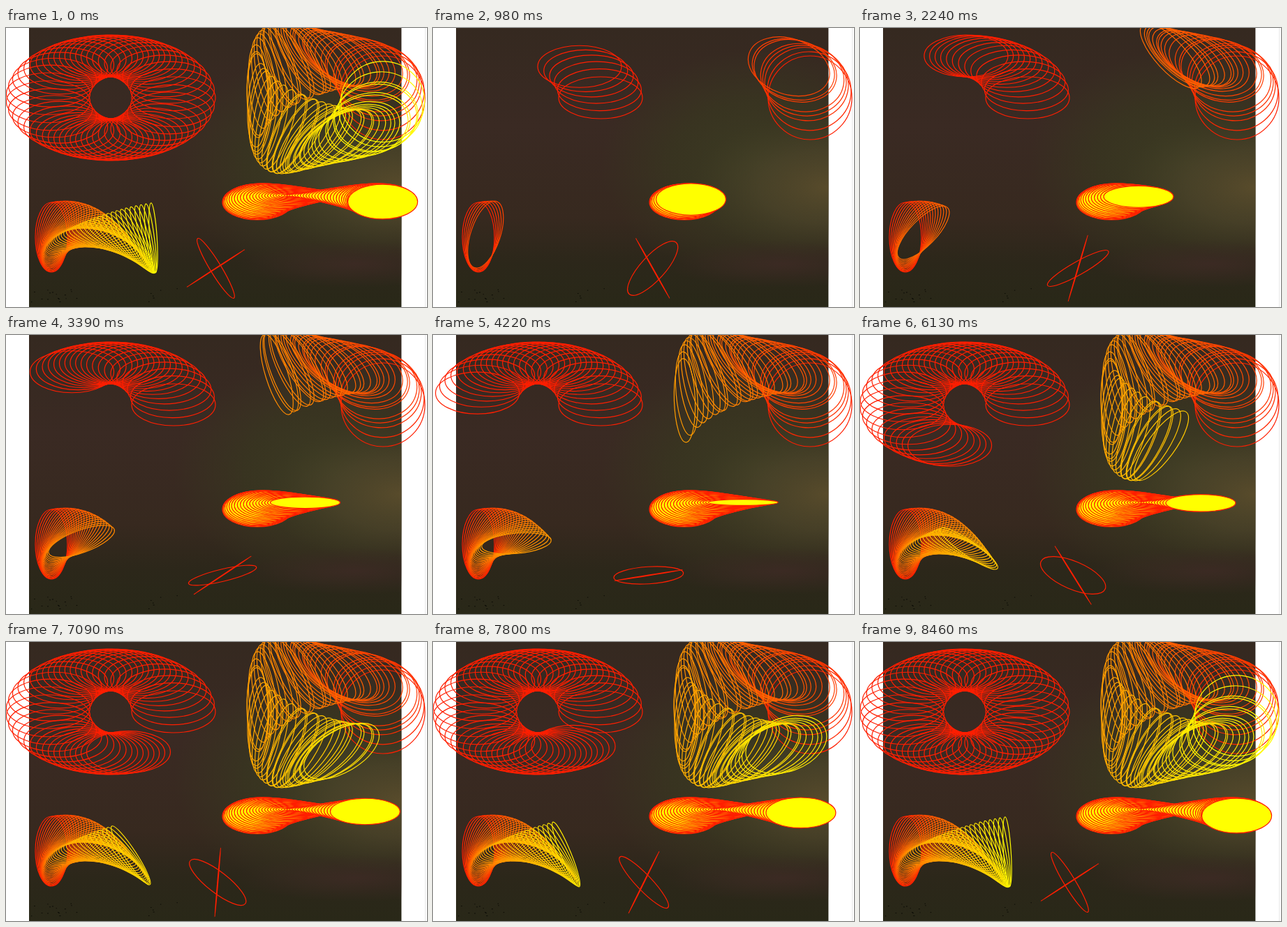
An HTML page for the animation above (8860 ms loop, 603 by 400 pixels).

```html
<!DOCTYPE html>
<html lang="en">
<head>
<meta charset="utf-8">
<title>Ellipse spirals</title>
<style>
  html, body { margin: 0; width: 100%; height: 100%; overflow: hidden; background: #fff; }
  svg { display: block; }
</style>
</head>
<body>
<svg id="stage" width="603" height="400" viewBox="0 0 603 400">
  <defs>
    <linearGradient id="ground" x1="0" y1="0" x2="0" y2="1">
      <stop offset="0" stop-color="#352920"/>
      <stop offset=".35" stop-color="#3a2a23"/>
      <stop offset=".68" stop-color="#37291f"/>
      <stop offset=".84" stop-color="#2c271a"/>
      <stop offset="1" stop-color="#292818"/>
    </linearGradient>
    <radialGradient id="moss">
      <stop offset="0" stop-color="#3d3c23"/>
      <stop offset=".55" stop-color="#383620" stop-opacity=".8"/>
      <stop offset="1" stop-color="#383620" stop-opacity="0"/>
    </radialGradient>
    <radialGradient id="glow">
      <stop offset="0" stop-color="#584b2b"/>
      <stop offset=".5" stop-color="#4c442a" stop-opacity=".7"/>
      <stop offset="1" stop-color="#403c24" stop-opacity="0"/>
    </radialGradient>
    <radialGradient id="dusk">
      <stop offset="0" stop-color="#3b2a23"/>
      <stop offset="1" stop-color="#3b2a23" stop-opacity="0"/>
    </radialGradient>
    <clipPath id="panel"><rect x="33" width="533.4" height="400"/></clipPath>
  </defs>
  <rect width="603" height="400" fill="#fff"/>
  <g clip-path="url(#panel)">
    <rect x="33" width="534" height="400" fill="url(#ground)"/>
    <ellipse cx="470" cy="195" rx="230" ry="165" fill="url(#moss)"/>
    <ellipse cx="565" cy="228" rx="195" ry="105" fill="url(#glow)"/>
    <ellipse cx="500" cy="338" rx="170" ry="34" fill="url(#dusk)"/>
    <g id="specks" fill="#0c0c06"></g>
  </g>
  <path d="M600.5 0V400" stroke="#e8e8e8"/>
  <g id="art" fill="none" stroke-width="1.2"></g>
</svg>
<script>
const LOOP = 8860, CLEAR = 330, STEPS = 49, LAST = 48.5;
const RED = '#ff1e00', YELLOW = '#ffff00';

// [time in ms, steps drawn]: bursts of drawing with short rests
const BEATS = [
  [330, 0], [930, 5], [1390, 6], [1590, 6.5], [2240, 12.5], [2400, 14], [2560, 14.5],
  [3060, 17.5], [3260, 18], [3390, 19], [4100, 22.5], [4160, 23], [4380, 24], [5140, 29],
  [5340, 29.5], [5940, 33], [6100, 34], [6890, 39], [7090, 40], [7890, 44], [8020, 45],
  [8460, LAST]
];

const { sin, cos, abs, PI } = Math;
const art = document.getElementById('art');

function add(parent, tag, attrs) {
  const node = document.createElementNS('http://www.w3.org/2000/svg', tag);
  parent.appendChild(node);
  return set(node, attrs);
}

function set(node, attrs) {
  for (const key in attrs) node.setAttribute(key, attrs[key]);
  return node;
}

const oval = (cx, cy, rx, ry, tilt = 0) =>
  ({ cx, cy, rx, ry, transform: `rotate(${tilt} ${cx} ${cy})` });

// Ellipse parameter of the point seen at a polar angle (axes 3:2)
const bend = angle => Math.atan2(1.5 * sin(angle), cos(angle));

const blend = p => `rgb(255,${Math.round(30 + 225 * p ** .8)},0)`;

function ring(p) {
  const a = bend(2 * PI * p);
  return { ...oval(150 + 90 * cos(a), 100 - 60 * sin(a), 60, 30), stroke: RED };
}

function horn(p) {
  const a = bend(2 * PI * p), squeeze = 45 * sin(bend(PI * p));
  return {
    ...oval(450 + 90 * cos(a), 100 - 60 * sin(a), 60, 60 - squeeze, 180 * p),
    stroke: blend(p)
  };
}

function wing(p) {
  const cx = 65 + 150 * p - 16 * sin(PI * p), cy = 300 - 6.5 * sin(2 * PI * p);
  return { ...oval(cx, cy, 50, 23 - 18 * p, 180 * p - 90), stroke: blend(p) };
}

function bowtie(p) {
  const a = bend(PI * p);
  return {
    ...oval(450 - 90 * cos(a), 250 - 10 * sin(a), 50, 3 + 22 * abs(cos(a))),
    stroke: RED, fill: YELLOW
  };
}

// Places ellipses along a path; the returned function shows those up to a progress
function trail(shape, steps = STEPS, jitter = 0) {
  const items = [];
  for (let n = 0; n < steps; n++) {
    const p = Math.max(0, n + jitter * sin(12.9 * n * n)) / steps;
    items.push({ p, node: add(art, 'ellipse', shape(p)) });
  }
  return limit => items.forEach(({ p, node }) =>
    node.setAttribute('visibility', p <= limit + 1e-6 ? 'visible' : 'hidden'));
}

const showRing = trail(ring);
const showHorn = trail(horn, 66, .4);
const showWing = trail(wing);
const showBowtie = trail(bowtie);
const hoop = add(art, 'ellipse', { stroke: RED });
const needle = add(art, 'ellipse', { stroke: RED });

function turnCross(p) {
  const cx = 316.3 - 16 * p, cy = 344.5;
  set(hoop, oval(cx, cy, 50, 14 + 6 * cos(3 * PI * p), 120 * p - 60));
  set(needle, oval(cx, cy, 49.5, .4, 300 * p - 150));
}

function stepsAt(time) {
  const i = BEATS.findIndex(beat => beat[0] > time);
  if (time < CLEAR || i < 0) return LAST;
  const [t0, n0] = BEATS[i - 1], [t1, n1] = BEATS[i];
  const n = n0 + (n1 - n0) * (time - t0) / (t1 - t0);
  return Math.floor(2 * n + 1e-6) / 2;
}

function render(time) {
  const n = stepsAt(time), p = n / STEPS;
  showRing(p);
  showHorn((n + 1) / STEPS);
  showWing(p);
  showBowtie(p);
  turnCross(p);
}

function scatterSpecks() {
  const specks = document.getElementById('specks');
  let seed = 7;
  const random = () => (seed = seed * 16807 % 2147483647) / 2147483647;
  for (let i = 0; i < 22; i++) {
    const x = i < 16 ? 36 + 70 * random() : 190 + 60 * random();
    add(specks, 'rect', { x, y: 372 + 22 * random(), width: 1 + random(), height: 1 });
  }
}

scatterSpecks();
const start = performance.now();
function tick() {
  render((performance.now() - start) % LOOP);
  requestAnimationFrame(tick);
}
tick();
</script>
</body>
</html>
```
